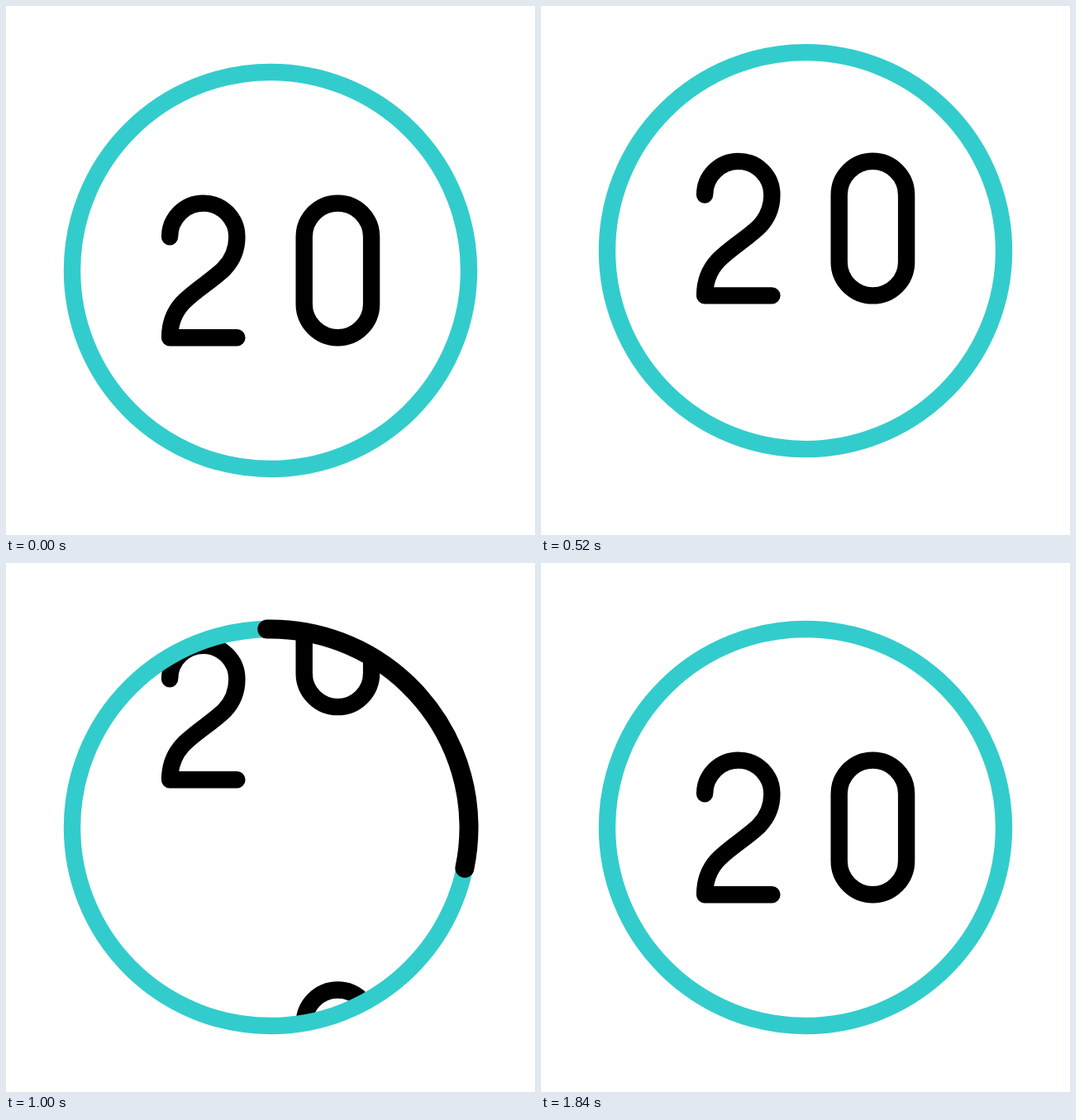
Animation, 640 px wide and 640 px high, one loop 2 s. Source, as an HTML page:

```html
<!DOCTYPE html>
<html lang="en">
<head>
<meta charset="utf-8">
<title>Countdown dial</title>
<style>
  html, body { margin: 0; width: 100%; height: 100%; overflow: hidden; background: #fff; }
  svg { display: block; width: 100%; height: 100%; }
  path, rect, .ring { fill: none; stroke: #000; stroke-width: 20.4; stroke-linecap: round; stroke-linejoin: round; }
  #ring { stroke: #3cc; }
  #sweep { stroke-width: 23; }
</style>
</head>
<body>
<svg viewBox="0 0 640 640">
  <defs>
    <clipPath id="dial"><circle cx="320" cy="320" r="240"/></clipPath>
    <path id="two" d="M198.1 279.3a40.65 40.65 0 0 1 81.3 0C279.4 296 273 308.5 263.7 318C250 331.5 227 345 213.5 359.5C203.5 370.5 198.1 384.5 198.1 401.2H279.4"/>
    <rect id="zero" x="360.7" y="238.6" width="81.4" height="162.6" rx="40.7"/>
  </defs>
  <g clip-path="url(#dial)">
    <g id="twos"><use href="#two"/><use href="#two" y="-505"/></g>
    <g id="zeros"><use href="#zero"/><use href="#zero" y="-505"/></g>
  </g>
  <circle id="ring" class="ring" cx="320" cy="320" r="240"/>
  <circle id="sweep" class="ring" cx="320" cy="320" r="240" pathLength="360" transform="rotate(-91 320 320)"/>
</svg>
<script>
const LOOP = 2000, STEP = 40;
const [twos, zeros, ring, sweep] = ['twos', 'zeros', 'ring', 'sweep'].map(id => document.getElementById(id));

const smooth = x => x * x * (3 - 2 * x);

// Cubic Bezier easing from (0,0) to (1,1) with handles (a,0) and (b,1)
const bezier = (a, b) => x => {
  let lo = 0, hi = 1;
  for (let i = 0; i < 24; i++) {
    const u = (lo + hi) / 2, v = 1 - u;
    if (3 * u * v * v * a + 3 * u * u * v * b + u * u * u < x) lo = u; else hi = u;
  }
  return smooth(lo);
};

// keys: [time, value, easing towards this key]
function track(t, keys) {
  if (t <= keys[0][0]) return keys[0][1];
  for (let i = 1; i < keys.length; i++) {
    const [t0, v0] = keys[i - 1], [t1, v1, ease = smooth] = keys[i];
    if (t < t1) return v0 + (v1 - v0) * ease((t - t0) / (t1 - t0));
  }
  return keys[keys.length - 1][1];
}

const digitY = (t, end, ease) => track(t, [[120, 0], [360, 51], [520, -50.8], [end, 505, ease]]);
const rollTwo = bezier(.366, .556), rollZero = bezier(.352, .55);
const shift = (el, y) => el.setAttribute('transform', `translate(0 ${y})`);

function draw(now) {
  const t = Math.floor(now % LOOP / STEP) * STEP;
  shift(twos, digitY(t, 1280, rollTwo));
  shift(zeros, digitY(t, 1445, rollZero));
  shift(ring, track(t, [[120, 0], [360, 33.3], [560, -30.5], [760, 0]]));

  const head = track(t, [[760, 0], [1440, 360]]);
  const tail = track(t, [[1040, 0], [1840, 360]]);
  sweep.style.display = head > tail ? '' : 'none';
  sweep.setAttribute('stroke-dasharray', `${head - tail} 360`);
  sweep.setAttribute('stroke-dashoffset', -tail);
}

let start;
function tick(now) {
  start ??= now;
  draw(now - start);
  requestAnimationFrame(tick);
}
draw(0);
requestAnimationFrame(tick);
</script>
</body>
</html>
```
